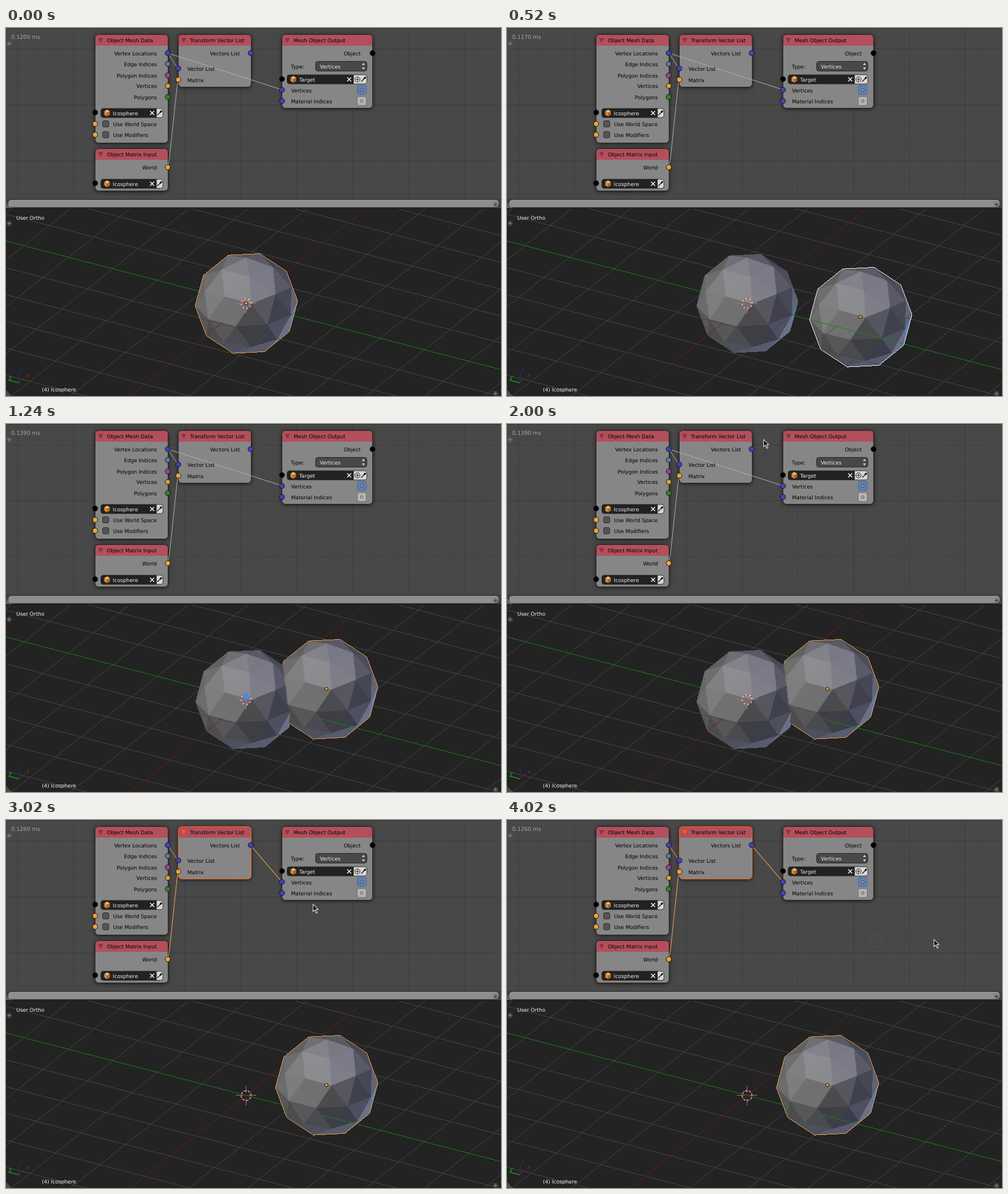
These frames come from a looping animation (869x645 px, 4060 ms). An HTML page with a canvas:

```html
<!DOCTYPE html>
<html lang="en">
<head>
<meta charset="utf-8">
<title>Node editor and viewport</title>
<style>
html, body { margin: 0; width: 100%; height: 100%; overflow: hidden; background: #232323; }
canvas { display: block; }
</style>
</head>
<body>
<canvas id="stage" width="869" height="645"></canvas>
<script>
const W = 869, H = 645, LOOP = 4060, TOP = 317;
const ctx = document.getElementById('stage').getContext('2d', { willReadFrequently: true });
ctx.textRendering = 'geometricPrecision';

// ---------- drawing helpers ----------
function rect(x, y, w, h, fill, r = 0, stroke) {
  ctx.beginPath();
  ctx.roundRect(x, y, w, h, r);
  if (fill) { ctx.fillStyle = fill; ctx.fill(); }
  if (stroke) { ctx.strokeStyle = stroke; ctx.lineWidth = 1; ctx.stroke(); }
}
function disc(x, y, r, fill, stroke) {
  ctx.beginPath();
  ctx.arc(x, y, r, 0, 7);
  if (fill) { ctx.fillStyle = fill; ctx.fill(); }
  if (stroke) { ctx.strokeStyle = stroke; ctx.lineWidth = 1; ctx.stroke(); }
}
function line(color, width, ...p) {
  ctx.beginPath();
  for (let i = 0; i < p.length; i += 2) ctx.lineTo(p[i], p[i + 1]);
  ctx.strokeStyle = color;
  ctx.lineWidth = width;
  ctx.stroke();
}
function poly(fill, ...p) {
  ctx.beginPath();
  for (let i = 0; i < p.length; i += 2) ctx.lineTo(p[i], p[i + 1]);
  ctx.closePath();
  ctx.fillStyle = fill;
  ctx.fill();
}
function text(s, x, y, fill = '#000', align = 'left', size = 9.1) {
  ctx.font = size + 'px "DejaVu Sans", sans-serif';
  ctx.textAlign = align;
  ctx.fillStyle = fill;
  ctx.fillText(s, x, y + 3.6);
}

// ---------- timing ----------
const RUNS = [[180, 670, 11], [720, 1240, 10], [1290, 1540, 6], [1720, 2160, 12], [2260, 2620, 9],
  [2790, 3300, 12], [3340, 3340, 2], [3520, 3680, 5], [3820, 4020, 6]];
const BALL = [[130, 0, 0], [180, 6, 1], [270, 85, 8], [370, 195, 20], [470, 206, 30], [570, 191, 18],
  [670, 159, 5], [720, 140, 6], [850, 114, 3], [1000, 109, -11], [1130, 128, -18], [1240, 141, -18]];
const MOUSE = [[1720, 522, 77], [1850, 490, 45], [2000, 450, 26], [2160, 430, 42], [2260, 430, 42],
  [2620, 488, 109], [2790, 488, 109], [3300, 600, 192], [3340, 615, 198], [3520, 615, 198],
  [3680, 648, 212], [3820, 648, 212], [3900, 690, 214], [4020, 749, 208]];
const COST = [[0, 1200], [180, 1180], [230, 1220], [320, 1190], [370, 1160], [420, 1210], [520, 1170],
  [620, 1250], [720, 1230], [830, 1200], [950, 1260], [1060, 1210], [1240, 1390], [2790, 1260]];

// Holds each pose until the next step; steps fall on multiples of 10 ms.
function snap(t) {
  let s = 0;
  for (const [a, b, n] of RUNS) {
    const step = (b - a) / (n - 1) || 1;
    const k = Math.floor((t - a + 9.99) / step);
    if (t >= a) s = Math.min(b, a + Math.floor(k * step / 10) * 10);
  }
  return s;
}
function along(keys, t) {
  let a = keys[0];
  for (const b of keys) {
    if (t < b[0]) {
      const k = Math.max(0, (t - a[0]) / (b[0] - a[0] || 1));
      return [a[1] + (b[1] - a[1]) * k, a[2] + (b[2] - a[2]) * k];
    }
    a = b;
  }
  return [a[1], a[2]];
}

// ---------- orthographic view ----------
const CX = 422, CY = 482.8, UNIT = 90, COS = 0.497, SIN = 0.868, TILT = 0.453, RISE = 0.891;
const view = ([x, y, z]) => [
  COS * x - SIN * y,
  TILT * (SIN * x + COS * y) + RISE * z,
  -RISE * (SIN * x + COS * y) + TILT * z];

function floorLine(color, x, y, slope) {
  const v = view([x, y, 0]);
  ctx.fillStyle = color;
  for (let px = 0; px < W; px++) {
    const py = CY - v[1] * UNIT + (px + 0.5 - CX - v[0] * UNIT) * slope;
    if (py >= TOP) ctx.fillRect(px, Math.floor(py), 1, 1);
  }
}
function drawFloor() {
  const alongX = -SIN * TILT / COS, alongY = COS * TILT / SIN;
  rect(0, TOP, W, H - TOP, '#232323');
  for (let i = -14; i <= 14; i++) if (i) {
    floorLine('#454545', i, 0, alongY);
    floorLine('#454545', 0, i, alongX);
  }
  floorLine('#7a1616', 0, 0, alongX);
  floorLine('#178217', 0, 0, alongY);
}

// ---------- icosphere ----------
const dot = (a, b) => a[0] * b[0] + a[1] * b[1] + a[2] * b[2];
const unit = v => v.map(c => c / Math.hypot(...v));
const mid = (a, b) => unit(a.map((c, i) => c + b[i]));
const minus = (a, b) => a.map((c, i) => c - b[i]);
const cross = (a, b) => [a[1] * b[2] - a[2] * b[1], a[2] * b[0] - a[0] * b[2], a[0] * b[1] - a[1] * b[0]];

// direction, diffuse colour, strength of the highlight
const LIGHTS = [
  [unit([-0.892, 0.3, 0.9]), [0.64, 0.64, 0.64], 18],
  [unit([0.588, 0.46, 0.248]), [0.398, 0.4, 0.48], 18],
  [unit([0.216, -0.392, -0.216]), [0.638, 0.67, 0.8], 0]];
const RIM = unit([0.96, -0.26, 0.09]);

function shade(n) {
  const color = dot(n, RIM) > 0.985 ? [-20, 5, 36] : [0, 0, 0];
  for (const [dir, diffuse, shine] of LIGHTS) {
    const lit = Math.max(0, dot(n, dir));
    const glint = shine * Math.max(0, dot(n, mid(dir, [0, 0, 1]))) ** 10;
    diffuse.forEach((c, i) => { color[i] += 188 * lit * c + glint; });
  }
  return color;
}
function makeFaces() {
  const ring = (turn, z) => [0, 1, 2, 3, 4].map(i => {
    const a = (i * 72 + turn) * Math.PI / 180;
    return [Math.cos(a) * 0.89443, Math.sin(a) * 0.89443, z];
  });
  const up = ring(0, 0.44721), low = ring(36, -0.44721), tris = [];
  for (let i = 0; i < 5; i++) {
    const j = (i + 1) % 5;
    tris.push([[0, 0, 1], up[i], up[j]], [up[i], low[i], up[j]],
      [low[i], low[j], up[j]], [[0, 0, -1], low[i], low[j]]);
  }
  return tris.flatMap(([a, b, c]) => {
    const ab = mid(a, b), bc = mid(b, c), ca = mid(c, a);
    return [[a, ab, ca], [ab, b, bc], [ca, bc, c], [ab, bc, ca]];
  }).map(tri => {
    const [a, b, c] = tri.map(view);
    let n = unit(cross(minus(b, a), minus(c, a)));
    if (dot(n, a) < 0) n = n.map(v => -v);
    return { n, d: dot(n, a) * UNIT, color: shade(n) };
  });
}

// One depth and colour sprite serves both spheres, as the view has no perspective.
const HALF = 93, SIZE = HALF * 2, NONE = -1e6;
const depth = new Float32Array(SIZE * SIZE).fill(NONE);
const skin = [], rimPixels = [];
function makeSprite() {
  const faces = makeFaces();
  for (let k = 0; k < depth.length; k++) {
    const x = k % SIZE - HALF + 0.5;
    const y = HALF - Math.floor(k / SIZE) - 0.7;
    let front = 1e6, back = NONE;
    for (const f of faces) {
      const z = (f.d - f.n[0] * x - f.n[1] * y) / f.n[2];
      if (f.n[2] < 0) back = Math.max(back, z);
      else if (z < front) { front = z; skin[k] = f.color; }
    }
    if (front > back) depth[k] = front;
  }
  for (let k = SIZE; k < depth.length - SIZE; k++) {
    if (depth[k] === NONE && [1, -1, SIZE, -SIZE].some(s => depth[k + s] !== NONE)) rimPixels.push(k);
  }
}

drawFloor();
const base = ctx.getImageData(0, TOP, W, H - TOP);
const floorDepth = new Float32Array(W * (H - TOP)).fill(NONE);
for (let p = 0; p < floorDepth.length; p++) {
  const lit = base.data[p * 4] > 42 || base.data[p * 4 + 1] > 42;
  if (lit) floorDepth[p] = (Math.floor(p / W) + TOP + 0.5 - CY) * RISE / TILT;
}
makeSprite();

const put = (img, p, c) => { for (let i = 0; i < 3; i++) img.data[p * 4 + i] = c[i]; };
const corner = (dx, dy) => (483 - TOP - HALF + dy) * W + CX - HALF + dx;
const place = (k, o) => o + Math.floor(k / SIZE) * W + k % SIZE;

function drawSpheres(dx, dy, outline, both) {
  const img = new ImageData(new Uint8ClampedArray(base.data), W, H - TOP);
  const z = floorDepth.slice();
  const moved = corner(dx, dy);
  for (const k of rimPixels) put(img, place(k, moved), outline);
  for (const o of both ? [corner(0, 0), moved] : [moved]) {
    for (let k = 0; k < depth.length; k++) {
      if (depth[k] === NONE) continue;
      const p = place(k, o);
      if (depth[k] > z[p]) { z[p] = depth[k]; put(img, p, skin[k]); }
    }
  }
  ctx.putImageData(img, 0, TOP);
}

// ---------- viewport overlay ----------
function drawCursor3D() {
  const x = 421.5, y = 483, g = '#858585';
  line(g, 1, x - 18, y - 0.5, x - 5, y - 0.5);
  line(g, 1, x + 5, y - 0.5, x + 18, y - 0.5);
  line(g, 1, x, y - 17, x, y - 5);
  line(g, 1, x, y + 5, x, y + 17);
  for (let i = 0; i < 16; i++) {
    ctx.beginPath();
    ctx.arc(x, y, 8.7, i * Math.PI / 8, (i + 1) * Math.PI / 8);
    ctx.strokeStyle = i % 2 ? '#f2f2f2' : '#f01818';
    ctx.lineWidth = 1.2;
    ctx.stroke();
  }
}
function plus(x, y, color = '#8c8c8c') {
  disc(x, y, 5, 'rgba(100,100,100,.35)');
  line(color, 1, x - 3, y, x + 3, y);
  line(color, 1, x, y - 3, x, y + 3);
}
function hatch(y) {
  for (const s of [3, 6, 9]) line('#999', 1, 0, y - s, s, y);
}
function drawViewLabels() {
  text('User Ortho', 18, 332, '#f0f0f0');
  text('(4) Icosphere', 63, 633, '#f0f0f0');
  line('#27278e', 1, 23.5, 621, 23.5, 602);
  line('#8b1c1c', 1, 23, 621, 34, 612);
  line('#1c9a1c', 1.3, 23, 622, 4, 617);
  text('z', 25, 598, '#27278e');
  text('x', 36, 608, '#a02020');
  text('y', 5, 611, '#1fb01f');
  plus(5.5, 342.5);
  plus(859.5, 640.5);
  hatch(645);
}

// ---------- node editor ----------
const BLUE = '#4242bd', ORANGE = '#f0a13c', BLACK = '#000', WIRE = '#b2b2b2', HOT = '#ffab45';

function drawBackdrop() {
  rect(0, 0, W, TOP, '#484848');
  for (let i = 0; i < 46; i++) {
    const strong = i % 5 === 1 ? '#3d3d3d' : '#444';
    const x = Math.round(i * 19.6) + 0.5, y = Math.round(i * 19.6 + 16) + 0.5;
    line(strong, 1, x, 0, x, 299);
    if (y < 299) line(strong, 1, 0, y, W, y);
  }
  line('#303030', 1, 0, 0.5, W, 0.5);
  rect(0, 299, W, 18, '#404040');
  rect(3.5, 300.5, 862, 14, '#8e8e8e', 6, '#2c2c2c');
  line('#0c0c0c', 1, 0, 316.5, W, 316.5);
  plus(5.5, 27.5);
  plus(859.5, 309.5, '#333');
  hatch(316);
}
function node(x, y, w, h, title, selected) {
  ctx.save();
  ctx.shadowColor = 'rgba(0,0,0,.75)';
  ctx.shadowBlur = 7;
  ctx.shadowOffsetY = 1;
  rect(x, y, w, h, '#868686', 6);
  ctx.restore();
  rect(x, y, w, 19.5, '#b34f5c', [6, 6, 0, 0]);
  rect(x, y, w, h, null, 6, selected ? '#f4600f' : '#2b2325');
  poly(selected ? '#ff5a0c' : '#843640', x + 5, y + 6, x + 14, y + 6, x + 9.5, y + 14.5);
  text(title, x + 20.5, y + 10);
}
const socket = (x, y, color) => disc(x, y, 4.5, color, '#111');
function output(x, y, label, color) {
  text(label, x - 19, y, '#000', 'right');
  socket(x, y, color);
}
function input(x, y, label, color) {
  text(label, x + 16, y + 0.5);
  socket(x, y, color);
}
function eyedropper(x, y) {
  line('#111', 1.2, x - 4, y + 4, x + 1, y - 1);
  line('#111', 3, x + 1, y - 1, x + 4, y - 4);
}
function field(x, y, w, name, extra) {
  rect(x, y - 8, w + extra, 16, '#d6d6d6', 4, '#333');
  rect(x, y - 8, w, 16, '#222', [4, 0, 0, 4]);
  poly('#f3b068', x + 11, y - 6, x + 16, y - 3, x + 11, y, x + 6, y - 3);
  poly('#d98a3c', x + 6, y - 3, x + 11, y, x + 11, y + 6, x + 6, y + 3);
  poly('#b06a24', x + 16, y - 3, x + 11, y, x + 11, y + 6, x + 16, y + 3);
  text(name, x + 21, y + 0.3, '#eee');
  const c = x + w - 8;
  line('#fff', 1.4, c - 3.5, y - 3.5, c + 3.5, y + 3.5);
  line('#fff', 1.4, c - 3.5, y + 3.5, c + 3.5, y - 3.5);
  eyedropper(x + w + extra - 6, y);
}
function checkbox(y, label) {
  rect(169.5, y - 5.5, 11, 11, '#545454', 2.5, '#303030');
  text(label, 188, y + 0.5);
  socket(156.5, y, ORANGE);
}
function toggle(y, fill, dotFill) {
  rect(616.5, y - 8, 16, 16, fill, 3, '#666');
  disc(624.5, y, 2, dotFill, '#222');
}

function drawNodes(t, mouse) {
  const selected = t >= 2260, linked = t >= 2750;
  node(156.5, 11.5, 128, 190, 'Object Mesh Data');
  node(156.5, 211.5, 128, 74, 'Object Matrix Input');
  node(302.5, 11.5, 128, 92, 'Transform Vector List', selected);
  node(484.5, 11.5, 159, 129, 'Mesh Object Output');

  const wire = selected ? HOT : WIRE;
  if (!linked) line(WIRE, 1, 284, 44, 484, 108);
  line(wire, 1, 284, 44, 302, 71);
  line(wire, 1, 284, 244, 287, 228, 300, 105, 302, 91);
  if (linked) line(HOT, 1.1, 429, 44, 484, 108);
  else if (selected) line(HOT, 1.1, 429, 44, mouse[0] - 3, mouse[1] - 1);

  output(284, 44, 'Vertex Locations', BLUE);
  output(284, 63, 'Edge Indices', '#607a96');
  output(284, 83, 'Polygon Indices', '#8b4896');
  output(284, 101.5, 'Vertices', '#cf9f3f');
  output(284, 121, 'Polygons', '#3b7c30');
  field(166.5, 149, 98, 'Icosphere', 11);
  socket(156.5, 148, BLACK);
  checkbox(168, 'Use World Space');
  checkbox(187, 'Use Modifiers');

  output(284, 244, 'World', ORANGE);
  field(166.5, 273, 98, 'Icosphere', 11);
  socket(156.5, 272, BLACK);

  output(429.5, 44, 'Vectors List', BLUE);
  input(302.5, 71, 'Vector List', BLUE);
  input(302.5, 90.5, 'Matrix', ORANGE);

  text('Object', 622.5, 44, '#000', 'right');
  socket(643.5, 44, BLACK);
  text('Type:', 500, 67);
  rect(543.5, 58.5, 90, 17, '#484848', 4, '#262626');
  text('Vertices', 551, 67, '#eee');
  poly('#ccc', 625, 65, 630, 65, 627.5, 60.5);
  poly('#ccc', 625, 69, 630, 69, 627.5, 73.5);
  field(493.5, 90, 117, 'Target', 23);
  disc(617, 90, 4.5, null, '#222');
  line('#222', 1, 614, 90, 620, 90);
  line('#222', 1, 617, 87, 617, 93);
  socket(484.5, 89.5, BLACK);
  input(484.5, 108.5, 'Vertices', BLUE);
  input(484.5, 128, 'Material Indices', BLUE);
  toggle(108.5, '#587fbd', '#f1d3a0');
  toggle(128, '#b4b4b4', '#eee');
}

// ---------- pointer ----------
function ripple(x, y, age) {
  if (age < 0 || age >= 300) return;
  const blue = a => `rgba(75,135,215,${Math.max(0, a)})`;
  const r = 7 + Math.min(1, age / 150) * 4;
  disc(x, y, r, blue(0.75 * (1 - age / 150)));
  if (!age) return;
  ctx.setLineDash([3, 2]);
  disc(x, y, r, null, blue(1 - age / 300));
  ctx.setLineDash([]);
}
function drawPointer([x, y], pressed) {
  if (pressed) disc(x - 1, y, 8, 'rgba(65,125,225,.6)');
  ctx.save();
  ctx.translate(x, y);
  poly('#e8e8e8', 0, 0, 0, 15, 3.4, 12, 6, 17.3, 8.8, 16, 6.4, 11, 10.5, 10.5);
  poly('#111', 1, 2.5, 1, 12.6, 3.7, 10.2, 6.5, 15.8, 7.4, 15.4, 4.8, 9.9, 8.2, 9.6);
  ctx.restore();
}

function draw(t) {
  const s = snap(t);
  const [dx, dy] = along(BALL, s).map(Math.round);
  const mouse = along(MOUSE, s);
  const grabbing = t >= 180 && t < 1240;

  drawSpheres(dx, dy, grabbing ? [245, 245, 245] : [240, 160, 65], t < 2790);
  drawCursor3D();
  disc(421.5 + dx, 482.5 + dy, 2.8, '#f2a23c', '#000');
  drawViewLabels();

  drawBackdrop();
  const cost = COST.filter(c => c[0] <= t).pop()[1];
  text('0.' + cost + ' ms', 9, 15.4, '#a6a6a6', 'left', 9.6);
  drawNodes(t, mouse);

  if (t >= 1240) ripple(422, 478, s - 1240);
  if (t >= 3820) ripple(648, 212, s - 3820);
  if (t >= 1720) drawPointer(mouse, t >= 2260 && t < 2790);
}

const start = performance.now();
function frame() {
  draw((performance.now() - start) % LOOP);
  requestAnimationFrame(frame);
}
frame();
</script>
</body>
</html>
```
